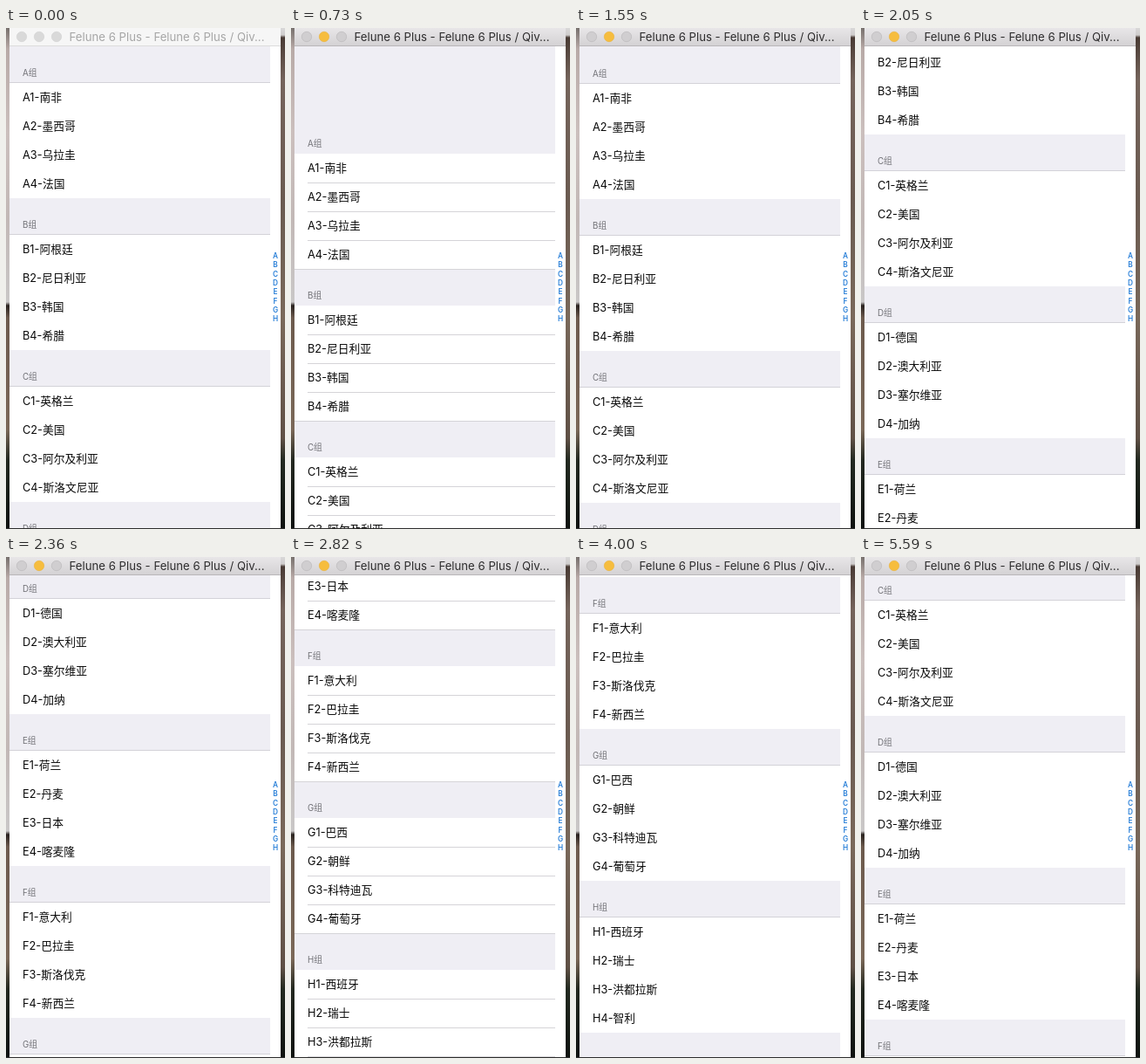
An HTML page with a canvas for the animation above (6.55 s loop, 320x574 px).

```html
<!DOCTYPE html>
<html lang="zh-CN">
<head>
<meta charset="utf-8">
<title>Grouped list</title>
<style>
html, body { margin: 0; width: 100%; height: 100%; overflow: hidden; background: #fff; }
canvas { display: block; width: 320px; height: 574px; }
</style>
</head>
<body>
<canvas id="stage"></canvas>
<script>
const W = 320, H = 574, LOOP = 6550, FPS = 22, ACTIVE_FROM = 50;
const LEFT = 4, LIST_RIGHT = 303, RIGHT = 315, BAR = 21, BOTTOM = 573;
const ROW = 33, SECTION = 174, FIRST_ROW = 63;
const FONT = 'Inter, "Noto Sans CJK SC", "Noto Sans CJK", sans-serif';

const groups = [
  '南非 墨西哥 乌拉圭 法国',
  '阿根廷 尼日利亚 韩国 希腊',
  '英格兰 美国 阿尔及利亚 斯洛文尼亚',
  '德国 澳大利亚 塞尔维亚 加纳',
  '荷兰 丹麦 日本 喀麦隆',
  '意大利 巴拉圭 斯洛伐克 新西兰',
  '巴西 朝鲜 科特迪瓦 葡萄牙',
  '西班牙 瑞士 洪都拉斯 智利'
].map((names, i) => ({ letter: 'ABCDEFGH'[i], names: names.split(' ') }));

// [step at FPS, scroll offset]
const scrollKeys = [
  [0, 0], [1, 0], [8, -32], [15, -78], [22, -95], [25, -52.5],
  [28, -20], [30, -9], [34, -1], [36, 0], [37, 0],
  [44, 210], [52, 537], [62, 807.5], [68, 884], [73, 918],
  [79, 895], [84, 873], [88, 868], [106, 868],
  [110, 755], [114, 515], [118, 400], [121, 361], [145, 361]
];

const slope = i => (scrollKeys[i + 1][1] - scrollKeys[i][1]) / (scrollKeys[i + 1][0] - scrollKeys[i][0]);

function tangent(i) {
  if (i === 0 || i === scrollKeys.length - 1) return 0;
  const a = slope(i - 1), b = slope(i);
  return a * b > 0 ? 2 * a * b / (a + b) : 0;
}

// Monotone cubic interpolation between the scroll keys.
function scrollAt(step) {
  let i = 0;
  while (i < scrollKeys.length - 2 && step >= scrollKeys[i + 1][0]) i++;
  const [s0, p] = scrollKeys[i], [s1, q] = scrollKeys[i + 1];
  const d = s1 - s0, u = (step - s0) / d, v = 1 - u;
  return p + (q - p) * u * u * (3 - 2 * u) +
    d * u * v * (v * tangent(i) - u * tangent(i + 1));
}

const canvas = document.getElementById('stage');
const ctx = canvas.getContext('2d');
const scale = window.devicePixelRatio || 1;
canvas.width = W * scale;
canvas.height = H * scale;
ctx.scale(scale, scale);

function rect(x, y, w, h, fill) {
  ctx.fillStyle = fill;
  ctx.fillRect(x, y, w, h);
}

function label(text, x, y, size, fill, weight = 400, align = 'left') {
  ctx.font = `${weight} ${size}px ${FONT}`;
  ctx.textAlign = align;
  ctx.fillStyle = fill;
  ctx.fillText(text, x, y);
}

function vertical(height, ...stops) {
  const g = ctx.createLinearGradient(0, 0, 0, height);
  stops.forEach(([y, color]) => g.addColorStop(y / height, color));
  return g;
}

const leftEdge = vertical(H, [0, '#77706d'], [24, '#b8aaa7'], [120, '#cbbfbd'], [220, '#c2b8b6'],
  [314, '#c9c7c7'], [318, '#29221f'], [332, '#6c5a4d'], [460, '#7b6858'], [495, '#232820'], [H, '#0d110e']);
const rightEdge = vertical(H, [0, '#d9d8d8'], [8, '#cfcdcc'], [11, '#483a33'], [60, '#75645b'], [200, '#6a5a50'],
  [330, '#79685a'], [470, '#5f5045'], [495, '#222920'], [H, '#0d110e']);
const activeBar = vertical(BAR, [0, '#e8e6e8'], [BAR, '#d3d1d3']);

function drawBackdrop() {
  rect(0, 0, LEFT, H, leftEdge);
  rect(RIGHT, 0, W - RIGHT, H, rightEdge);
  rect(0, BOTTOM, W, 1, '#2c2c2c');
}

function drawSection({ letter, names }, top, rowLines) {
  rect(LEFT, top, LIST_RIGHT - LEFT, ROW * names.length, '#fff');
  label(letter + '组', 19, top - 8, 9.75, '#717176');
  names.forEach((name, i) => {
    label(`${letter}${i + 1}-${name}`, 19, top + i * ROW + 21, 12.75, '#0a0a0a');
    if (!rowLines) return;
    const x = i === names.length - 1 ? LEFT : 19;
    rect(x, top + (i + 1) * ROW, LIST_RIGHT - x, 1, '#d5d4d8');
  });
  if (!rowLines) rect(LEFT, top - 1, LIST_RIGHT - LEFT, 1, '#d3d2d8');
}

function drawList(offset) {
  ctx.save();
  ctx.beginPath();
  ctx.rect(LEFT, BAR, RIGHT - LEFT, BOTTOM - BAR);
  ctx.clip();
  rect(LEFT, BAR, LIST_RIGHT - LEFT, H, '#efeef4');
  rect(LIST_RIGHT, BAR, RIGHT - LIST_RIGHT, H, '#fff');
  // Hairlines survive downscaling only at certain subpixel positions.
  const part = offset - Math.floor(offset);
  const rowLines = part > 0.25 && part < 0.75;
  groups.forEach((group, i) => {
    const top = Math.floor(FIRST_ROW + i * SECTION - offset + 1e-6);
    if (top < H + 42 && top + 4 * ROW > 0) drawSection(group, top, rowLines);
  });
  groups.forEach(({ letter }, i) =>
    label(letter, 309, 264 + i * 10.3, 8.25, '#2b80d8', 600, 'center'));
  ctx.restore();
}

function drawTitleBar(active) {
  rect(LEFT, 0, RIGHT - LEFT, BAR, active ? activeBar : '#f6f6f6');
  rect(LEFT, BAR - 1, RIGHT - LEFT, 1, active ? '#b9b7b9' : '#dcdcdc');
  [18, 38, 58].forEach((x, i) => {
    const lit = active && i === 1;
    ctx.beginPath();
    ctx.arc(x, 10, 5.7, 0, Math.PI * 2);
    ctx.fillStyle = lit ? '#f6bd3e' : active ? '#d0ced0' : '#d9d9d9';
    ctx.fill();
    ctx.lineWidth = 0.6;
    ctx.strokeStyle = lit ? '#eab23c' : active ? '#b8b6b8' : '#d0d0d0';
    ctx.stroke();
  });
  label('Felune 6 Plus - Felune 6 Plus / Qiv...', 72.5, 15, 13.2, active ? '#2e2d2e' : '#a6a6a6');
}

// The list moves in whole steps, each held until the next.
function draw(t) {
  const step = Math.floor(t * FPS / 1000 + 0.15);
  drawBackdrop();
  drawList(scrollAt(step));
  drawTitleBar(t >= ACTIVE_FROM);
}

const start = performance.now();
function tick(now) {
  draw(Math.max(0, now - start) % LOOP);
  requestAnimationFrame(tick);
}
draw(0);
requestAnimationFrame(tick);
</script>
</body>
</html>
```
